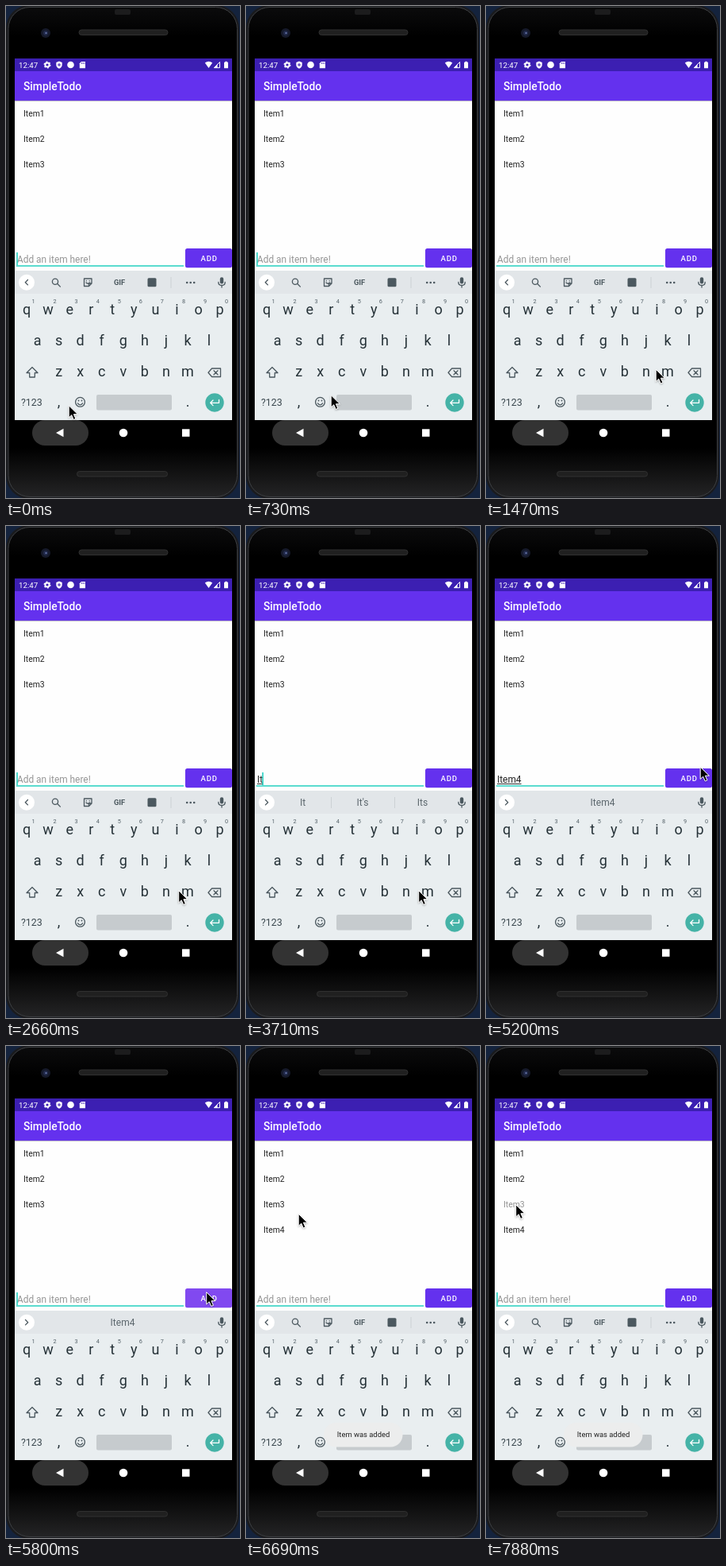
Recreate the animation shown at these times as an HTML page. Size 295 by 619 pixels, loop 8 s.

```html
<!DOCTYPE html>
<html lang="en">
<head>
<meta charset="utf-8">
<title>Todo list on a phone</title>
<style>
  html, body { margin: 0; width: 100%; height: 100%; overflow: hidden; background: #000; }
  svg { display: block; width: 295px; height: 619px; font-family: Roboto, sans-serif; }
  .mid { text-anchor: middle; }
  .white { fill: #fff; }
  .item { font-size: 10.4px; fill: #222; }
  .edit { font-size: 11.9px; }
  .key { font-size: 18px; fill: #263238; text-anchor: middle; }
  .num { font-size: 7.3px; fill: #546168; text-anchor: middle; }
  .word { font-size: 12px; fill: #5c676d; text-anchor: middle; }
  .line { fill: none; stroke: #4b585f; stroke-width: 1.3; stroke-linejoin: round; stroke-linecap: round; }
  .solid { fill: #4b585f; }
  .sep { fill: none; stroke: #ccd1d4; }
  .slot { fill: #202020; stroke: #303030; }
</style>
</head>
<body>
<svg viewBox="0 0 295 619">
  <defs>
    <linearGradient id="body" x2="0" y2="1">
      <stop offset="0" stop-color="#0b0b0c"/><stop offset=".06" stop-color="#000"/>
      <stop offset=".9" stop-color="#000"/><stop offset="1" stop-color="#242425"/>
    </linearGradient>
    <filter id="soft" x="-30%" y="-30%" width="160%" height="170%">
      <feDropShadow dx="0" dy="1" stdDeviation="1" flood-opacity=".3"/>
    </filter>
  </defs>

  <!-- phone -->
  <rect width="295" height="619" fill="#14233d"/>
  <rect x="0" y="-1" width="294" height="621" rx="29" fill="#1a1b1e"/>
  <rect x="3" y="1.500" width="288.500" height="616" rx="27" fill="url(#body)" stroke="#3d3f42"/>
  <rect x="137" y="4" width="20" height="7" rx="2" fill="#1c1c1d"/>
  <rect x="92" y="30" width="112" height="6.500" rx="3.250" class="slot"/>
  <rect x="89.500" y="585.500" width="114" height="6.500" rx="3.250" class="slot"/>
  <circle cx="50" cy="34" r="6" fill="#161a2b"/>
  <circle cx="50" cy="34" r="3" fill="#232b4c"/>
  <circle cx="50.500" cy="34" r="1" fill="#7385b8"/>

  <!-- status and title bars -->
  <rect x="11" y="66" width="274" height="16" fill="#3c1fb2"/>
  <rect x="11" y="82" width="274" height="37.300" fill="#6431ee"/>
  <g class="white">
    <text x="16" y="77.600" font-size="9.700">12:47</text>
    <text x="22" y="106" font-size="13.800" font-weight="500">SimpleTodo</text>
    <circle cx="52" cy="74" r="2.600" fill="none" stroke="#fff" stroke-width="2"/>
    <circle cx="52" cy="74" r="3.900" fill="none" stroke="#fff" stroke-width="1.200" stroke-dasharray="2 2.080"/>
    <path d="M67 69.500l3.700 1.500v3q0 3.300-3.700 4.800q-3.700-1.500-3.700-4.800v-3z"/>
    <path d="M67 72v4M65 74h4" stroke="#3c1fb2"/>
    <circle cx="81.500" cy="74" r="4.300"/>
    <path d="M95 70h5v8.200h-7.200v-6z"/>
    <path d="M95.500 71v2M97.200 71v2M98.900 71v2" stroke="#3c1fb2" stroke-width=".7"/>
    <path d="M250.800 71.500q4.700-3.500 9.400 0l-4.700 6.500z"/>
    <path d="M269.500 70.500v7.200h-7.200z" fill="none" stroke="#fff"/>
    <path d="M266.500 73.500v4.200h-4.200z"/>
    <path d="M275 70.700h1.300v-1h2.400v1h1.300v7.600h-5z"/>
  </g>

  <!-- list and entry row -->
  <rect x="11" y="119.300" width="274" height="214" fill="#fefefe"/>
  <g id="items"></g>
  <text id="hint" class="edit" x="14" y="322.800" fill="#969696">Add an item here!</text>
  <text id="entry" class="edit" x="14" y="322.800" fill="#222"></text>
  <rect id="under" x="14" y="324" height="1" fill="#333"/>
  <rect x="13" y="326.300" width="211" height="1.400" fill="#17cdbd"/>
  <rect id="caret" y="310" width="1.500" height="16" fill="#17cdbd"/>
  <rect id="button" x="226" y="305" width="59" height="24.200" rx="2.500"/>
  <text class="mid white" x="256.200" y="320.800" font-size="9.500" font-weight="500" letter-spacing=".85">ADD</text>

  <!-- keyboard -->
  <rect x="11" y="333" width="274" height="188" fill="#e9eef0"/>
  <rect x="11" y="333" width="274" height="29" fill="#e2e6e9"/>
  <circle cx="26" cy="347.700" r="10" class="white"/>
  <path id="chevron" class="line"/>
  <g id="tools">
    <circle cx="62" cy="346.700" r="3.600" class="line"/>
    <path d="M64.800 349.500l3.600 3.600" class="line"/>
    <path d="M98.500 343h9.500v6l-3.500 3.500h-6zM108 349h-3.500v3.500" class="line"/>
    <path d="M101 348q2 2.500 4.500 0" class="line"/>
    <circle cx="101.300" cy="345.700" r=".7" class="solid"/><circle cx="105.200" cy="345.700" r=".7" class="solid"/>
    <text x="143" y="351.200" class="mid solid" font-size="9.300" font-weight="700">GIF</text>
    <rect x="178.500" y="342.300" width="11" height="11" rx="1.500" class="solid"/>
    <path d="M208 341v14" class="sep"/>
    <g class="solid">
      <circle cx="228.200" cy="348" r="1.300"/><circle cx="232.700" cy="348" r="1.300"/><circle cx="237.200" cy="348" r="1.300"/>
    </g>
  </g>
  <path id="seps" d="M107.500 341v14M187.500 341v14" class="sep"/>
  <g id="words"></g>
  <rect x="269.800" y="341.300" width="4.400" height="8.200" rx="2.200" class="solid"/>
  <path d="M267.800 347.500q0 4 4.200 4t4.200-4M272 351.500v2.500" class="line"/>
  <g id="keys"></g>
  <path d="M33 454.500l7 7h-3.700v5.500h-6.600v-5.500h-3.700z" class="line"/>
  <path d="M259.500 456h11v10.500h-11l-4.500-5.250zM262 458.800l5 5M267 458.800l-5 5" class="line"/>
  <text x="19" y="503.200" font-size="12.400" fill="#3a474e">?123</text>
  <circle cx="93.500" cy="498.300" r="5.900" class="line"/>
  <path d="M90.500 499.800q3 4 6 0" class="line"/>
  <circle cx="91.500" cy="496.500" r=".9" class="solid"/><circle cx="95.500" cy="496.500" r=".9" class="solid"/>
  <rect x="114" y="489" width="95" height="19.500" rx="2" fill="#c6cbce"/>
  <circle cx="263" cy="499" r="11.700" fill="#45b3a7"/>
  <path d="M268.500 495.500v3.800h-10.500M261 496l-3.300 3.300l3.300 3.300" class="line" style="stroke:#fff"/>

  <!-- navigation -->
  <rect x="33" y="521" width="71" height="32" rx="16" fill="#333"/>
  <g class="white">
    <path d="M63 537l9.500-5.300v10.600z"/>
    <circle cx="148" cy="537" r="5.300"/>
    <rect x="222" y="532.300" width="9.500" height="9.500"/>
  </g>

  <g id="toast">
    <rect x="98" y="474" width="99.500" height="30.500" rx="15.250" fill="#eceded"/>
    <text class="mid" x="148" y="492.300" font-size="9.400" fill="#222">Item was added</text>
  </g>

  <path id="pointer" d="M0 0v15.200l3.500-3.200l2.500 5.700l2.700-1.100l-2.500-5.600h5z"
        fill="#000" stroke="#fff" stroke-width="1" stroke-linejoin="round" filter="url(#soft)"/>
</svg>

<script>
const LOOP = 8000;
const $ = id => document.getElementById(id);

function label(parent, cls, x, y, text = '') {
  const el = document.createElementNS('http://www.w3.org/2000/svg', 'text');
  el.setAttribute('class', cls);
  el.setAttribute('x', x);
  el.setAttribute('y', y);
  el.textContent = text;
  return $(parent).appendChild(el);
}
const show = (el, on) => { el.style.display = on ? '' : 'none'; };

const items = [1, 2, 3, 4].map(n => label('items', 'item', 22, 107.3 + 32 * n, 'Item' + n));
const words = [71.5, 147, 222.5].map(x => label('words', 'word', x, 352.3));

// Key rows share one centre line.
const MIDDLE = 147.8, PITCH = 27.06;
[['qwertyuiop', 387.5], ['asdfghjkl', 426.7], ['zxcvbnm', 466.3]].forEach(([row, y], r) => {
  [...row].forEach((ch, i) => {
    const x = MIDDLE + (i - (row.length - 1) / 2) * PITCH;
    label('keys', 'key', x, y, ch);
    if (r === 0) label('keys', 'num', x + 8.5, 374, (i + 1) % 10);
  });
});
label('keys', 'key', 66.5, 503.5, ',');
label('keys', 'key', 229, 503.5, '.');

// Each track is a list of [start, ...values], held until the next start.
const path = [
  [0, 80, 503], [140, 81, 502], [290, 85, 500], [440, 94, 496], [590, 108, 490],
  [740, 126, 482], [880, 146, 474], [1020, 165, 467], [1170, 181, 462],
  [1320, 203, 459], [1470, 215, 457.5], [1620, 217, 458], [1770, 218, 458.5], [1920, 218.5, 459],
  [4900, 225, 436], [5050, 252, 356], [5200, 271, 303.5], [5350, 276, 306], [5500, 261, 310], [5650, 253.5, 310],
  [6100, 240, 300], [6250, 196, 270], [6400, 136, 237], [6540, 92, 219], [6690, 67, 211.5],
  [6840, 48, 205], [6990, 39.5, 202], [7130, 39, 200.5], [7280, 38.5, 200]
];
const typed = [
  [0, ''], [3410, 'I'], [3710, 'It'], [3860, 'Ite'], [4010, 'Item'], [4610, 'Item4'], [5800, '']
];
const hints = [
  [0], [3410, 'I', "I'm", 'I have'], [3710, 'It', "It's", 'Its'], [3860, 'Ite', 'Item', 'Items'],
  [4010, 'Item', 'Items', 'Itemize'], [4610, '', 'Item4', ''], [5950]
];
const paint = [[0, '#6431ee'], [5650, '#7139ef'], [5800, '#8149f0'], [5950, '#713bef'], [6100, '#6431ee']];
const fade = [[0, 0], [5950, .35], [6100, 1]];
// Caret switches, starting from visible.
const blinks = [140, 590, 1170, 1620, 2210, 2660, 3110, 3410, 5200, 5650, 6400, 6840, 7280, 7880];

const at = (track, t) => track.findLast(step => step[0] <= t).slice(1);

function draw(t) {
  const [x, y] = at(path, t);
  $('pointer').setAttribute('transform', `translate(${x - 0.8} ${y - 0.3})`);

  const [text] = at(typed, t);
  const entry = $('entry');
  entry.textContent = text;
  const width = text ? entry.getComputedTextLength() : 0;
  $('under').setAttribute('width', width);
  show($('hint'), !text);
  $('caret').setAttribute('x', 13.3 + width);
  show($('caret'), blinks.filter(b => b <= t).length % 2 === 0);

  const list = at(hints, t);
  words.forEach((el, i) => { el.textContent = list[i] || ''; });
  show($('tools'), !list.length);
  show($('seps'), list[0]);
  $('chevron').setAttribute('d', list.length ? 'M24.500 344.500l3.200 3.200l-3.200 3.200' : 'M27.500 344.500l-3.200 3.200l3.200 3.200');

  $('button').setAttribute('fill', at(paint, t)[0]);
  $('toast').style.opacity = at(fade, t)[0];
  show(items[3], t >= 5950);
  items[2].style.fill = t >= 7880 ? '#919191' : '';
}

const start = performance.now();
function tick() {
  draw((performance.now() - start) % LOOP);
  requestAnimationFrame(tick);
}
tick();
</script>
</body>
</html>
```
